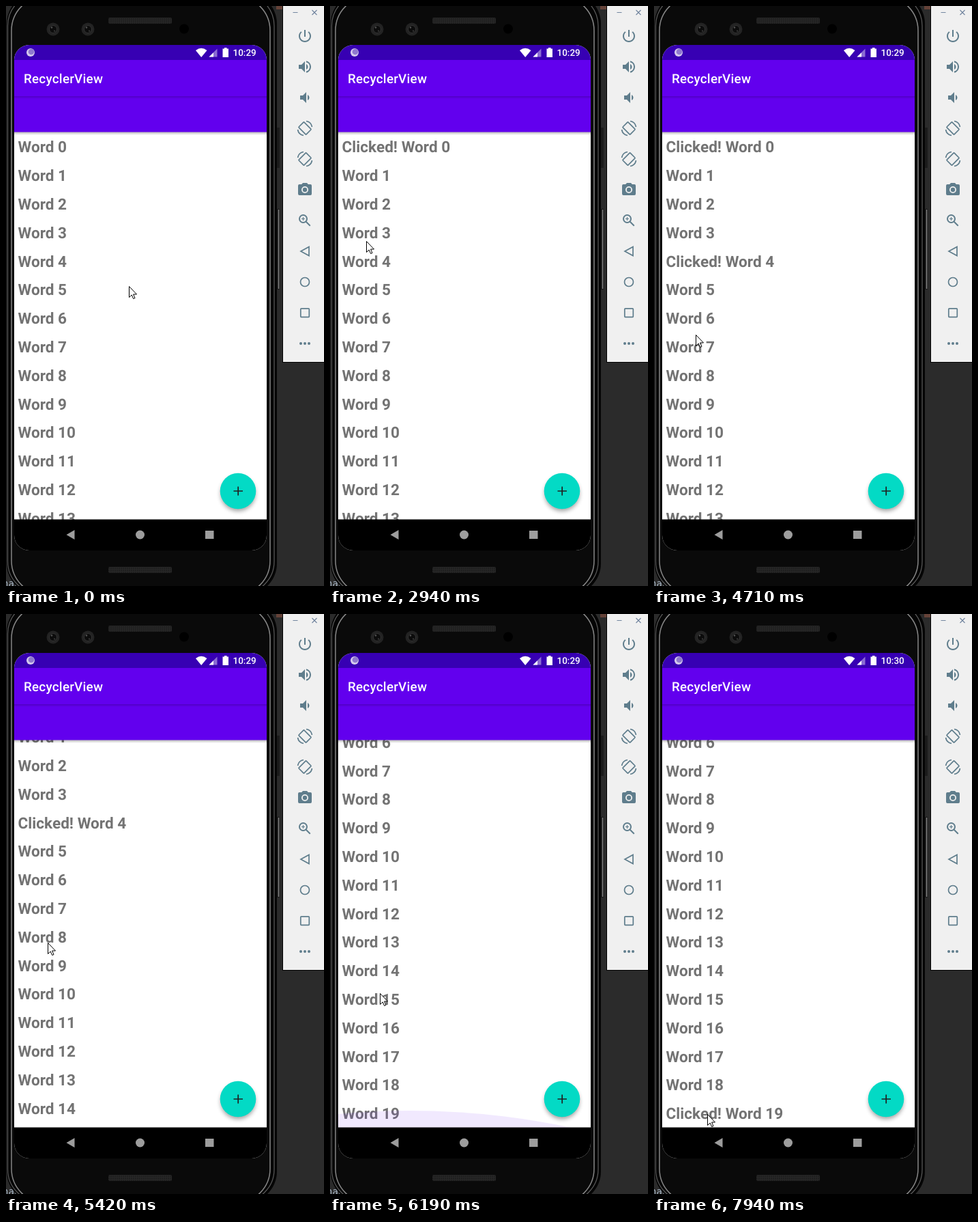
Write an HTML page that moves like this. It is 466 by 849 pixels and loops after 8 s.

```html
<!DOCTYPE html>
<html lang="en">
<head>
<meta charset="utf-8">
<title>Word list</title>
<style>
html, body { margin: 0; width: 100%; height: 100%; overflow: hidden; background: #2b2b2b; }
svg { display: block; }
text { font-family: Roboto, sans-serif; text-rendering: geometricPrecision; }
#list text { font-size: 22.6px; font-weight: 700; fill: #737373; }
.line { fill: none; stroke: #5f7d8c; stroke-width: 2; }
.thin { stroke-width: 1.7; }
</style>
</head>
<body>
<svg width="466" height="849" viewBox="0 0 466 849">
  <defs>
    <clipPath id="screen"><rect x="12" y="57" width="370" height="740" rx="22"/></clipPath>
    <clipPath id="page"><rect x="12" y="184" width="370" height="568"/></clipPath>
    <linearGradient id="shade" x2="0" y2="1">
      <stop stop-color="#000" stop-opacity=".3"/><stop offset="1" stop-color="#000" stop-opacity="0"/>
    </linearGradient>
    <pattern id="mesh" width="3" height="3" patternUnits="userSpaceOnUse">
      <rect width="3" height="3" fill="#272727"/><circle cx="1" cy="1" r=".8" fill="#111"/>
    </pattern>
    <filter id="soft" x="-50%" y="-50%" width="200%" height="200%"><feGaussianBlur stdDeviation="3"/></filter>
  </defs>

  <!-- desktop behind the phone -->
  <rect width="466" height="849" fill="#2b2b2b"/>
  <path d="M396 0h9v5h-9z" fill="#654238"/>
  <text x="-5" y="850" font-size="14" fill="#a9b7c6" style="font-family:'DejaVu Sans Mono',monospace">nac</text>

  <!-- phone -->
  <path d="M396 178h5v59h-5z" fill="#1b1b1b"/>
  <path d="M396 297h5v118h-5z" fill="#161616"/>
  <path d="M399.500 298v116" stroke="#858585" stroke-width="1.500"/>
  <rect x="1" y="-20" width="396" height="882" rx="46" fill="#050505"/>
  <rect x="2.500" y="-18" width="390.500" height="878" rx="47" fill="none" stroke="#5c5c5c" stroke-width="1.200"/>
  <rect x="8" y="-14" width="379" height="876" rx="50" fill="#0a0a0a" stroke="#868686" stroke-width="1.500"/>
  <rect x="150" y="17" width="93" height="9" rx="2" fill="url(#mesh)"/>
  <rect x="150" y="821" width="93" height="9" rx="2" fill="url(#mesh)"/>
  <g id="lenses"></g>
  <circle cx="261" cy="33.500" r="7" fill="#000"/>

  <g clip-path="url(#screen)">
    <rect x="12" y="57" width="370" height="740" fill="#fff"/>
    <g clip-path="url(#page)">
      <g id="list"></g>
      <path id="glow" fill="#6200ee"/>
      <rect x="12" y="184" width="370" height="5" fill="url(#shade)"/>
    </g>
    <rect x="12" y="79" width="370" height="105.500" fill="#6200ee"/>
    <rect x="12" y="132" width="370" height="4" fill="url(#shade)" opacity=".6"/>
    <rect x="12" y="57" width="370" height="22" fill="#3700b3"/>
    <rect x="12" y="751.500" width="370" height="46" fill="#000"/>
    <circle cx="36" cy="68" r="6" fill="#d5cbed"/>
    <circle cx="37" cy="67" r="4.300" fill="#8f79cf"/>
    <path d="M278 65Q286 58.500 294.500 65L286.200 75Z" fill="#fff"/>
    <path d="M309.500 62.500v12h-12z" fill="#8b6dd3"/>
    <path d="M304 68.200v6.300h-6.500z" fill="#fff"/>
    <path d="M320 61h3.500v1.500h2.500v12.500h-8.500v-12.500h2.500z" fill="#fff"/>
    <text id="clock" x="332.500" y="73" font-size="13.500" font-weight="500" fill="#fff"></text>
    <text x="26" y="113" font-size="18.850" letter-spacing=".0125em" font-weight="500" fill="#fff">RecyclerView</text>
    <g fill="#9d9d9d">
      <path d="M100.500 767v14l-12-7z"/><circle cx="196.500" cy="774" r="6.500"/><path d="M292 768h12.500v12h-12.500z"/>
    </g>
    <circle cx="340" cy="714" r="25.500" opacity=".36" filter="url(#soft)"/>
    <circle cx="340" cy="710" r="26.300" fill="#03dac5"/>
    <path d="M333.500 710h13.500M340.200 703.500v13" stroke="#202020" stroke-width="1.700"/>
  </g>

  <!-- side panel -->
  <path d="M405 0h61v522h-61z"/>
  <path d="M406 0h60v521h-60z" fill="#f0f0f0"/>
  <path class="line" style="stroke:#7386a0;stroke-width:1.200" d="M420.500 9.500h7M448.500 6l7 7m0-7l-7 7"/>
  <g id="icons" fill="#5f7d8c"></g>

  <path id="cursor" d="M.5.5V16.500L4.200 13 6.700 18.500 9 17.500 6.600 12H11.500Z" fill="#fff" stroke="#000"/>
  <circle id="press" r="15" fill="#ff0" fill-opacity=".47"/>
</svg>
<script>
const $ = id => document.getElementById(id);
const LOOP = 8000, STEP = 78, ROW = 41.8, WORDS = 20;

const tilted = '<rect class="line thin" x="6.500" y="4.300" width="11" height="15.400" rx="1" transform="rotate(-45 12 12)"/>' +
  '<path class="line thin" d="M14 1.500A10.500 10.500 0 0 1 22.500 10M10 22.500A10.500 10.500 0 0 1 1.500 14"/>';
const icons = [
  '<path d="M13 3h-2v10h2V3zm4.830 2.170l-1.420 1.420C17.990 7.860 19 9.810 19 12c0 3.870-3.130 7-7 7s-7-3.130-7-7c0-2.190 1.010-4.140 2.580-5.420L6.170 5.170C4.230 6.820 3 9.260 3 12c0 4.970 4.030 9 9 9s9-4.030 9-9c0-2.740-1.230-5.180-3.170-6.830z"/>',
  '<path d="M3 9v6h4l5 5V4L7 9H3zm13.500 3c0-1.770-1.020-3.290-2.500-4.030v8.050c1.480-.730 2.500-2.250 2.500-4.020z"/><path class="line" d="M14 4.250a8 8 0 0 1 0 15.500"/>',
  '<path d="M18.500 12c0-1.770-1.020-3.290-2.500-4.030v8.050c1.480-.730 2.500-2.250 2.500-4.020zM5 9v6h4l5 5V4L9 9H5z"/>',
  tilted,
  `<g transform="matrix(-1 0 0 1 24 0)">${tilted}</g>`,
  '<path fill-rule="evenodd" d="M9 2L7.200 4H4a2 2 0 0 0-2 2v12a2 2 0 0 0 2 2h16a2 2 0 0 0 2-2V6a2 2 0 0 0-2-2h-3.200L15 2zM7 12a5 5 0 0 1 10 0a5 5 0 0 1-10 0z"/><circle cx="12" cy="12" r="3.200"/>',
  '<circle class="line" cx="9.500" cy="9.500" r="5.500"/><path class="line" d="M13.700 13.700l6 6"/><path class="line" style="stroke-width:1.200" d="M7 9.500h5M9.500 7v5"/>',
  '<path class="line thin" d="M18 5.500v13L6 12z"/>',
  '<circle class="line thin" cx="12" cy="12" r="6.500"/>',
  '<rect class="line thin" x="5.800" y="5.800" width="12.500" height="12.500" rx="1"/>',
  '<circle cx="6" cy="12" r="2"/><circle cx="12" cy="12" r="2"/><circle cx="18" cy="12" r="2"/>'
];
$('icons').innerHTML = icons.map((art, i) => `<g transform="translate(426 ${32 + i * 45})">${art}</g>`).join('');

$('lenses').innerHTML = [69, 120].map(x =>
  `<circle cx="${x}" cy="34" r="9.500" fill="#232323"/><circle cx="${x}" cy="34" r="5.500" fill="#0c0c0c" stroke="#343434"/>
   <circle cx="${x - 2}" cy="31.500" r="1.200" fill="#555"/><circle cx="${x + 2}" cy="36.500" r="1" fill="#444"/>`).join('');

$('list').innerHTML = Array.from({ length: WORDS }, (_, i) => `<text x="17.500" y="${214.45 + i * ROW}"></text>`).join('');
const rows = [...$('list').children];

const path = [
  [0, 180, 410], [350, 62, 173], [430, 62, 173], [590, 62, 193], [740, 62, 193], [1060, 62, 206],
  [2370, 62, 206], [2600, 58, 268], [2940, 53, 344], [3250, 53, 352], [3480, 53, 375],
  [4320, 53, 375], [4710, 61, 481], [5960, 61, 481], [6040, 63, 497], [6190, 73, 555],
  [6500, 77, 660], [6890, 78, 708], [7200, 78, 732]
];
const scroll = [[5180, 0], [5260, 14], [5420, 68], [5710, 206.5], [5870, 258], [5960, 269.5]];
const glow = [[5880, 0, 0], [6040, 25, .09], [6190, 25, .085], [6730, 0, 0]]; // height, opacity
const clicks = { 0: 1600, 4: 4020, 19: 7940 };
const presses = [1290, 3790, 7540];

function track(keys, t) {
  const next = keys.findIndex(k => k[0] > t);
  if (next < 0) return keys.at(-1).slice(1);
  if (next === 0) return keys[0].slice(1);
  const a = keys[next - 1], b = keys[next];
  const held = Math.floor((t - a[0] + 4) / STEP) * STEP;
  const p = Math.min(1, held / (b[0] - a[0]));
  return a.slice(1).map((v, i) => v + (b[i + 1] - v) * p);
}

function draw(t) {
  rows.forEach((row, i) => {
    row.textContent = (t >= clicks[i] ? 'Clicked! ' : '') + 'Word ' + i;
  });
  $('list').setAttribute('transform', `translate(0 ${-track(scroll, t)[0]})`);
  const [height, alpha] = track(glow, t);
  $('glow').setAttribute('d', `M-118 752Q118 ${752 - 2 * height} 354 752Z`);
  $('glow').setAttribute('opacity', alpha);
  $('clock').textContent = t < 7540 ? '10:29' : '10:30';
  const place = `translate(${track(path, t).map(Math.round)})`;
  $('cursor').setAttribute('transform', place);
  $('press').setAttribute('transform', place);
  $('press').setAttribute('visibility', presses.some(p => t >= p && t < p + 150) ? 'visible' : 'hidden');
}

const start = performance.now();
function tick() {
  draw((performance.now() - start) % LOOP);
  requestAnimationFrame(tick);
}
tick();
</script>
</body>
</html>
```
